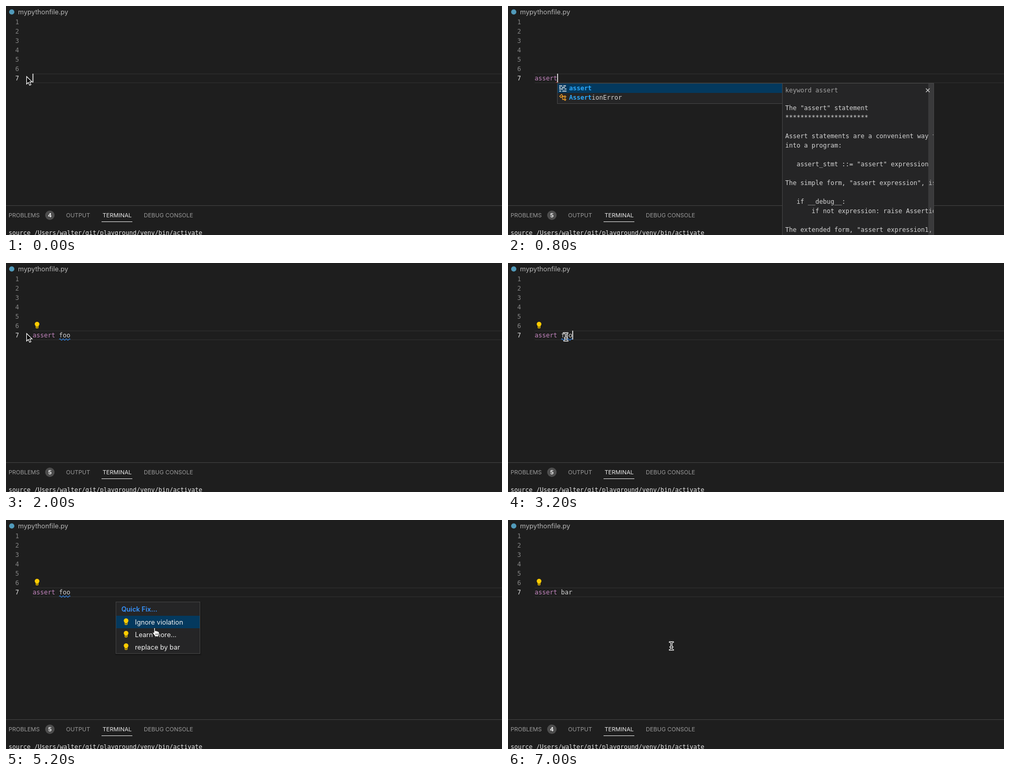
These frames come from a looping animation (950 by 440 pixels, 7.2 s). An HTML page:

```html
<!DOCTYPE html>
<html lang="en">
<head>
<meta charset="utf-8">
<title>Editor quick fix</title>
<style>
  html, body { margin: 0; width: 100%; height: 100%; overflow: hidden; background: #1e1e1e; }
  svg { display: block; width: 950px; height: 440px; }
  text { white-space: pre; fill: #d4d4d4; font: 12px "DejaVu Sans Mono", monospace; }
  .ui { font: 12.7px Inter, sans-serif; }
  .tab { font: 11px Inter, sans-serif; fill: #9a9a9a; }
  .box { fill: #252526; stroke: #454545; }
  .pick { fill: #04395e; }
  .hit { fill: #2aaaff; font-weight: bold; }
  .dim { fill: #a3a3a3; }
  .link { fill: #3794ff; }
  .cross { stroke: #d0d0d0; stroke-width: 1.2; }
</style>
</head>
<body>
<svg viewBox="0 0 950 440">
  <defs>
    <g id="bulb">
      <path d="M-4.5-1.5a4.5 4.5 0 1 1 9 0C4.5.5 2.5 1.5 2.5 3v2.5q0 1-1 1h-3q-1 0-1-1V3C-2.5 1.500-4.500.5-4.500-1.500z" fill="#fc0"/>
      <path d="M-1.200 3.300h2.400v2h-2.400z" fill="#3a3208"/>
    </g>
    <g id="class" fill="none" stroke-width="1.3">
      <path d="M1 4.500 4.500 1 7 3.500 3.500 7zM5.500 5H9M6.500 5v5.500H9M9.300 5 11 3.300 13 5.200 11.300 7zM9.300 10.500 11 8.800 13 10.700 11.300 12.500z"/>
    </g>
  </defs>

  <circle cx="11" cy="11.500" r="5" fill="#519aba"/>
  <text class="ui" x="23" y="16" style="fill:#b4b4b4">mypythonfile.py</text>
  <g id="gutter" text-anchor="end"></g>
  <path d="M51 130.500H950M51 147.500H950" stroke="#303030"/>
  <text x="51" y="143"><tspan id="keyword" fill="#c586c0"></tspan><tspan id="name"></tspan></text>
  <path id="squiggle" d="M102 147q1.500-3 3 0t3 0t3 0t3 0t3 0t3 0t3 0" fill="none" stroke="#3794ff" stroke-width="1.2"/>
  <rect id="caret" y="130" width="1.800" height="17" fill="#d8d8d8"/>
  <use id="fixBulb" href="#bulb" x="59.500" y="119"/>

  <path d="M0 383.500H950" stroke="#434343"/>
  <g>
    <text class="tab" x="5" y="406">PROBLEMS</text>
    <circle cx="84" cy="402" r="9" fill="#4d4d4d"/>
    <text id="badge" class="tab" x="84" y="406" text-anchor="middle" style="fill:#fff;font-weight:600"></text>
    <text class="tab" x="115" y="406">OUTPUT</text>
    <text class="tab" x="185" y="406" style="fill:#e7e7e7">TERMINAL</text>
    <path d="M183 414.500H242" stroke="#e7e7e7"/>
    <text class="tab" x="264" y="406">DEBUG CONSOLE</text>
    <text x="5" y="440" style="font-size:11.630px;fill:#e5e5e5">source /Users/walter/git/playground/venv/bin/activate</text>
  </g>

  <g id="assertList">
    <path d="M92 147q1.500-2 3 0" stroke="#f14c4c" fill="none"/>
    <rect class="box" x="94.500" y="148.500" width="431" height="39"/>
    <rect class="pick" x="95" y="149" width="430" height="18"/>
    <path d="M98 153.500h6M106 153.500h5M98 156.500h3M103 156.500h6M98 159.500h8M108 159.500h4M98 163.500h4M104 163.500h8" stroke="#fff" stroke-width="1.300"/>
    <use href="#class" x="98" y="169" stroke="#ee9d28"/>
    <text x="117" y="162" class="hit">assert</text>
    <text x="117" y="180"><tspan class="hit">Assert</tspan>ionError</text>
    <clipPath id="docClip"><path d="M526 149h289v291h-289z"/></clipPath>
    <rect class="box" x="525.500" y="148.500" width="290" height="300"/>
    <text class="dim" x="531" y="166">keyword assert</text>
    <g id="doc" clip-path="url(#docClip)"></g>
    <path d="M805 149h10v291h-10z" fill="#797979" opacity=".25"/>
    <path class="cross" d="m800.500 158.500 7 7m0-7-7 7"/>
  </g>

  <g id="floatList">
    <rect class="box" x="123.500" y="148.500" width="431" height="39"/>
    <rect class="pick" x="124" y="149" width="430" height="18"/>
    <use href="#class" x="127" y="151" stroke="#fff"/>
    <use href="#class" x="127" y="169" stroke="#ee9d28"/>
    <text x="146" y="162"><tspan class="hit">F</tspan>l<tspan class="hit">o</tspan>atingP<tspan class="hit">o</tspan>intError</text>
    <text x="146" y="180">FileNot<tspan class="hit">Fo</tspan>undErr<tspan class="hit">o</tspan>r</text>
    <rect class="box" x="554.500" y="148.500" width="290" height="79"/>
    <text class="dim" x="560" y="166">class FloatingPointError(*args: obj</text>
    <text class="dim" x="560" y="184">ect)</text>
    <text x="560" y="218">Floating point operation failed.</text>
    <path class="cross" d="m829.500 158.500 7 7m0-7-7 7"/>
  </g>

  <g id="hover">
    <rect class="box" x="102.500" y="79.500" width="406" height="50"/>
    <path d="M103 106.500H508" stroke="#3c3c3c"/>
    <text x="110" y="97">do not use foo in assertions, use bar instead (rule-1)</text>
    <text class="ui link" x="110" y="122" style="font-size:12px">View Problem</text>
    <text class="ui link" x="210" y="122" style="font-size:12px">Quick Fix...</text>
  </g>

  <g id="menu">
    <rect x="209" y="158" width="165" height="102" opacity=".2"/>
    <rect class="box" x="210.500" y="157.500" width="161" height="99"/>
    <rect id="picked" class="pick" x="211" width="160" height="24"/>
    <text class="ui link" x="221" y="176" style="font-weight:600">Quick Fix...</text>
    <g id="items"></g>
  </g>

  <g id="arrow">
    <path d="M.5.5v14.500l3.300-3.200 2.400 5.400 2.600-1.100-2.400-5.200h4.600z" fill="#000" stroke="#fff" stroke-width="1.200"/>
  </g>
  <g id="beam" fill="none" stroke-linecap="round">
    <path id="beamPath" d="M-3-7.500q3 0 3 2.500v10q0 2.500-3 2.500M3-7.500q-3 0-3 2.500v10q0 2.500 3 2.500M-2 2h4" stroke="#fff" stroke-width="3.200"/>
    <use href="#beamPath"/>
    <path d="M-3-7.500q3 0 3 2.500v10q0 2.500-3 2.500M3-7.500q-3 0-3 2.500v10q0 2.500 3 2.500M-2 2h4" stroke="#111" stroke-width="1.200"/>
  </g>
  <g id="hand">
    <path d="M-1.500 1.500q0-1.500 1.200-1.500t1.300 1.500v5q.300-1.300 1.500-1.100t1.300 1.400q.400-.800 1.400-.500t1.200 1.400q.400-.600 1.200-.300t.900 1.600v3q0 2-1 3.500v1.500h-6.500q-2-3-4-5.500-1.600-2-.700-2.700t2.200.800z" fill="#fff" stroke="#000" stroke-width=".900"/>
    <path d="M2 11v3M4 11v3M6 11v3" stroke="#000" stroke-width=".700"/>
  </g>
</svg>
<script>
const LOOP = 7200, STEP = 200, CHAR = 7.224;
const $ = id => document.getElementById(id);
const show = (id, on) => $(id).style.display = on ? '' : 'none';
const between = (t, a, b) => t >= a && t < b;

$('gutter').innerHTML = [1, 2, 3, 4, 5, 6, 7].map(n =>
  `<text x="25" y="${17 + n * 18}" style="fill:${n === 7 ? '#e0e0e0' : '#858585'}">${n}</text>`).join('');

$('doc').innerHTML = `The "assert" statement
**********************

Assert statements are a convenient way to insert
into a program:

   assert_stmt ::= "assert" expression ["," expression]

The simple form, "assert expression", is equivalent

   if __debug__:
       if not expression: raise AssertionError

The extended form, "assert expression1, expression2"`
  .split('\n').map((s, i) => `<text x="531" y="${200 + i * 18}">${s}</text>`).join('');

$('items').innerHTML = ['Ignore violation', 'Learn more...', 'replace by bar'].map((s, i) =>
  `<use href="#bulb" x="230" y="${195 + i * 24}"/><text class="ui" x="247" y="${201 + i * 24}" style="fill:#f0f0f0">${s}</text>`).join('');

// Pointer path: time, x, y
const path = [
  [2000, 39, 135], [2400, 231, 180], [3000, 114, 143], [3200, 111, 142], [3700, 110, 142],
  [4200, 231, 115], [4400, 230, 112], [4600, 233, 120], [5400, 302, 236], [5800, 304, 241],
  [6200, 308, 244], [7000, 313, 242]
];

function pointer(t) {
  if (t < 2000) return [39, 135];
  const i = path.findIndex(p => p[0] >= t);
  if (i < 1) return path[0].slice(1);
  const [t0, x0, y0] = path[i - 1], [t1, x1, y1] = path[i];
  const k = (t - t0) / (t1 - t0);
  return [x0 + (x1 - x0) * k, y0 + (y1 - y0) * k];
}

function cursorKind(t, x, y) {
  if (between(t, 200, 2000)) return '';
  if (x < 48) return 'arrow';
  if (t === 4200 || between(t, 4400, 6200) && y > 184) return 'hand';
  return between(t, 4400, 6200) ? 'arrow' : 'beam';
}

function caretOn(t) {
  if (t < 1400) return true;
  if (t < 4400) return (t + 950) % 1000 < 500;
  return between(t, 6400, 6950);
}

function draw(t) {
  const typed = [0, 1, 3, 5, 6, 8, 10][Math.min(t / STEP, 6)];
  const line = t < 6400 ? 'assert foo' : 'assert bar';
  $('keyword').textContent = line.slice(0, Math.min(typed, 6));
  $('keyword').style.fill = typed < 6 ? '#d4d4d4' : '#c586c0';
  $('name').textContent = line.slice(6, typed);
  $('caret').setAttribute('x', 50.700 + typed * CHAR);
  $('badge').textContent = between(t, 800, 1200) || between(t, 1600, 6800) ? 5 : 4;

  show('caret', caretOn(t));
  show('squiggle', between(t, 1600, 6400));
  show('fixBulb', t >= 1600);
  show('assertList', between(t, 800, 1000));
  show('floatList', between(t, 1200, 1400));
  show('hover', between(t, 3600, 4400));
  show('menu', between(t, 4400, 6200));

  const [x, y] = pointer(t), kind = cursorKind(t, x, y);
  const row = Math.max(0, Math.min(2, Math.floor((y - 184) / 24)));
  $('picked').setAttribute('y', 184 + row * 24);
  for (const id of ['arrow', 'beam', 'hand']) {
    show(id, id === kind);
    $(id).setAttribute('transform', `translate(${x} ${y})`);
  }
}

const start = performance.now();
function tick() {
  const t = (performance.now() - start) % LOOP;
  draw(Math.floor(t / STEP) * STEP);
  requestAnimationFrame(tick);
}
tick();
</script>
</body>
</html>
```
